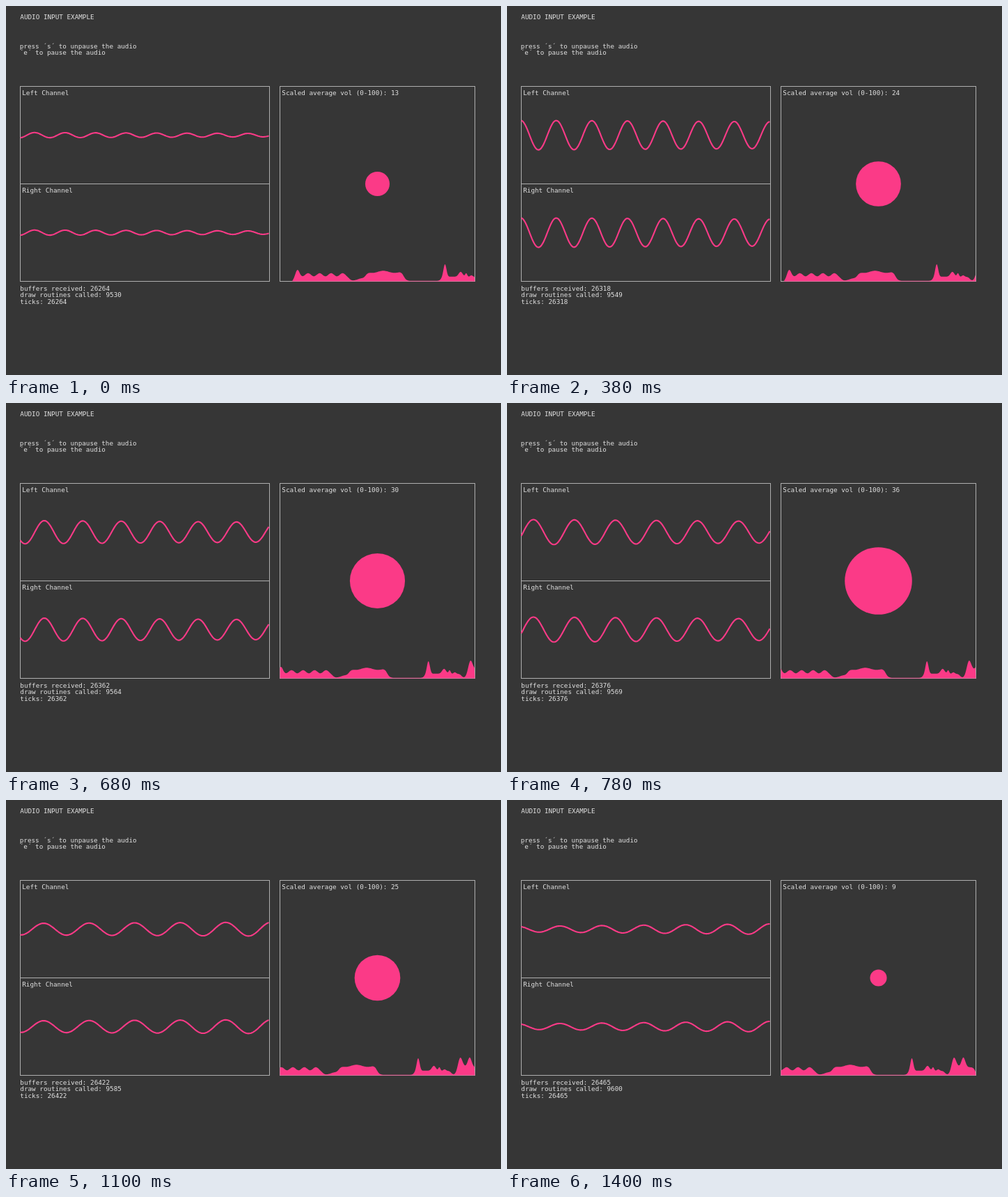
An HTML page with a canvas that plays this animation: 711x530 px, repeating every 1420 ms.

```html
<!DOCTYPE html>
<html lang="en">
<head>
<meta charset="utf-8">
<title>Audio input</title>
<style>
  html, body { margin: 0; width: 100%; height: 100%; overflow: hidden; background: #363636; }
  canvas { display: block; }
</style>
</head>
<body>
<canvas id="stage" width="711" height="530"></canvas>
<script>
const ctx = document.getElementById('stage').getContext('2d');
const PINK = '#fb3a87', TEXT = '#e1e1e1', BORDER = '#aeaeae';
const STEP = 20, STEPS = 71, UNIT = 0.7;
const LEFT = 20.5, TOP = 115.5, MID = 255.5, BOTTOM = 395.5;
const VOL_LEFT = 393.5, VOL_RIGHT = 673.5;

const bump = (x, center, width) => Math.exp(-(((x - center) / width) ** 2));
const gate = (x, from, to, soft) =>
  (Math.tanh((x - from) / soft) - Math.tanh((x - to) / soft)) / 2;

// Height of the volume graph at x: long swells with ripples, then single peaks.
function volumeHeight(x) {
  const chatter = gate(x, 414, 493, 3) * (8.8 + 2.2 * Math.cos((x - 450.5) * 0.38));
  const attack = 5.5 * bump(x, 419, 3.5);
  const swell = gate(x, 517, 571, 4) * (13 + 1.5 * Math.cos((x - 542) / 5));
  const murmur = 3.2 * bump(x, 510, 8) + 0.7;
  const spike = 18 * bump(x, 630.5, 3) + 6 * gate(x, 625, 678, 3);
  const echoes = 7 * bump(x, 653, 4) + 5 * bump(x, 661, 2) + 2 * bump(x, 668.5, 2.5);
  const peaks = 24 * bump(x, 691, 4.8) + 14 * bump(x, 704.5, 4);
  const tail = gate(x, 695, 721.5, 3) * 11;
  return chatter + attack + swell + murmur + spike + echoes + peaks + tail;
}

// Key points of the tone: step, wavelength, x of a crest, amplitude at left and right.
const tone = [
  [0, 43.8, 41, 3.8, 2.4], [8, 44.4, 28, 1.8, 1.8], [19, 51.15, 19.6, 21.3, 19.3],
  [28, 50.8, 23, 15, 12.8], [39, 58.9, 38, 18.2, 15.6], [55, 65.4, 54, 8.3, 10],
  [70, 60.2, 76, 4, 7.5]
];

const lerp = (a, b, u) => a + (b - a) * u;
const buffersAt = n => Math.round(2.868 * n);

// Each buffer moves the tone on by one panel width, so the phase follows the buffer count.
function toneAt(n) {
  const i = Math.max(1, tone.findIndex(key => key[0] >= n));
  const a = tone[i - 1], b = tone[i];
  const [, length, , left, right] = a.map((v, k) => lerp(v, b[k], (n - a[0]) / (b[0] - a[0])));
  const start = (LEFT - a[2]) / a[1], drift = (LEFT - b[2]) / b[1] - start;
  const first = buffersAt(a[0]), count = buffersAt(b[0]) - first;
  const turns = Math.round(count * 358.4 * 2 / (a[1] + b[1]) - drift);
  const phase = start + (turns + drift) * (buffersAt(n) - first) / count;
  return { length, left, right, phase };
}

function label(text, x, y) {
  ctx.fillStyle = TEXT;
  text.split('\n').forEach((line, i) => ctx.fillText(line, x, y + i * 9.45));
}

function box(x, y, w, h) {
  ctx.strokeStyle = BORDER;
  ctx.lineWidth = 1;
  ctx.strokeRect(x, y, w, h);
}

function channel(name, n, top) {
  label(name, 23.2, top + 12.8);
  box(LEFT, top, 358, 140);
  const { length, left, right, phase } = toneAt(n);
  ctx.beginPath();
  for (let i = 0; i < 256; i++) {
    const x = i * 1.4;
    const y = lerp(left, right, i / 255) * Math.cos(2 * Math.PI * (phase + x / length));
    ctx.lineTo(LEFT + x, top + 70 - y);
  }
  ctx.strokeStyle = PINK;
  ctx.lineWidth = 2.1;
  ctx.stroke();
}

function volume(n) {
  const shift = n * UNIT, level = volumeHeight(VOL_RIGHT + shift) / 0.49;
  label('Scaled average vol (0-100): ' + Math.round(level), 396.3, TOP + 12.8);
  box(VOL_LEFT, TOP, 280, 280);
  ctx.fillStyle = PINK;
  ctx.beginPath();
  ctx.arc(533.5, MID, level * 1.33, 0, 2 * Math.PI);
  ctx.fill();

  ctx.beginPath();
  ctx.moveTo(VOL_LEFT, BOTTOM);
  for (let x = VOL_LEFT; x <= VOL_RIGHT; x += UNIT) {
    ctx.lineTo(x, BOTTOM - volumeHeight(x + shift) * gate(x + shift, 411.5, 800, 0.8));
  }
  ctx.lineTo(VOL_RIGHT, BOTTOM);
  ctx.fill();
}

function draw(time) {
  const n = Math.floor(time / STEP) % STEPS;
  const ticks = 26264 + buffersAt(n);
  ctx.fillStyle = '#363636';
  ctx.fillRect(0, 0, 711, 530);
  ctx.font = '9.3px "DejaVu Sans Mono", monospace';
  label('AUDIO INPUT EXAMPLE', 20.3, 19);
  label('press ´s´ to unpause the audio\n´e´ to pause the audio', 19.7, 61);
  channel('Left Channel', n, TOP);
  channel('Right Channel', n, MID);
  volume(n);
  label(`buffers received: ${ticks}\ndraw routines called: ${9530 + n}\nticks: ${ticks}`, 20.3, 408.8);
}

const begin = performance.now();
function tick() {
  draw(performance.now() - begin);
  requestAnimationFrame(tick);
}
tick();
</script>
</body>
</html>
```
